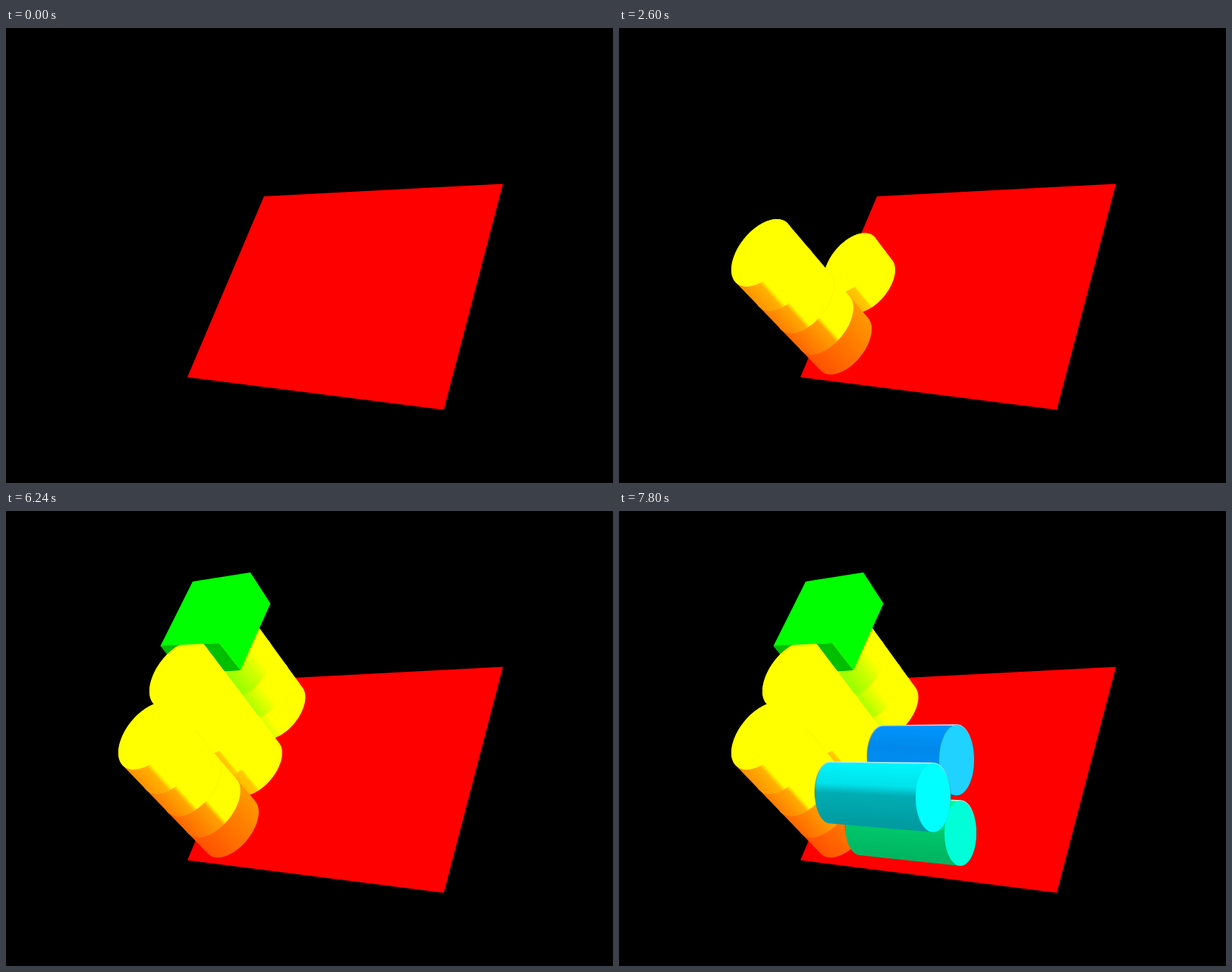
Animation, 800 px wide and 600 px high, one loop 8 s. Source, as an HTML page with a canvas:

```html
<!DOCTYPE html>
<html lang="en">
<head>
<meta charset="utf-8">
<title>Stacking cylinders</title>
<style>
html, body { margin: 0; width: 100%; height: 100%; overflow: hidden; background: #000; }
canvas { display: block; }
</style>
</head>
<body>
<canvas id="stage" width="800" height="600"></canvas>
<script>
const ctx = document.getElementById('stage').getContext('2d');
const LOOP = 8000, BEAT = 520, PI = Math.PI;
const TILT = PI * 2 / 3, UPRIGHT = PI / 2;
const LEVELS = 4, DEPTH = 1.12;   // depth: how much farther away the floor is than level 4

// A ring is [centre x, centre y, half width, half height].
// edge(i, n): where full light starts on drum i of n, as a share of its width
const left = {
  foot: [297, 417, 36, 40], head: [188, 296.5, 40, 44.5],
  dark: i => 19 + 5 * i, mid: i => 36 + 2 * i, soft: 0.06, cap: i => Math.min(60, 30 + 15 * i),
  edge: (i, n) => (0.17 + 0.33 / i) * (n < 3 ? 1.5 : 1)
};
const middle = {
  foot: [329, 338, 35, 38], head: [228, 215.5, 39, 44.5],
  dark: () => 38, mid: () => 48, soft: 0.03, cap: () => 60,
  edge: i => 0.34 - 0.07 * i
};
const right = {
  foot: [361, 264, 33.5, 37], head: [264.5, 143, 38.5, 44.5],
  dark: () => 95, mid: () => 72, soft: 0.2, cap: () => 60,
  edge: i => 0.33 + 0.2 * i
};

const hsl = (hue, light = 50) => `hsl(${hue}, 100%, ${light}%)`;

function poly(color, ...pts) {
  ctx.beginPath();
  pts.forEach(p => ctx.lineTo(...p));
  ctx.fillStyle = color;
  ctx.fill();
}

function arc([x, y, w, h], from, to, skew) {
  return Array.from({ length: 61 }, (_, i) => {
    const a = from + (to - from) * i / 60;
    return [x + w * Math.cos(a), y + h * Math.cos(a + skew)];
  });
}

function cylinder(base, top, stops, cap, skew, rim) {
  const dx = top[0] - base[0], dy = top[1] - base[1], len = Math.hypot(dx, dy);
  const nx = -dy / len, ny = dx / len;
  const [x, y, w, h] = top;
  const a = nx * w + ny * h * Math.cos(skew), b = -ny * h * Math.sin(skew);
  const start = Math.atan2(b, a), reach = Math.hypot(a, b);
  const blend = list => {
    const g = ctx.createLinearGradient(x - nx * reach, y - ny * reach, x + nx * reach, y + ny * reach);
    list.forEach(s => g.addColorStop(...s));
    return g;
  };
  poly(blend(stops),
    ...arc(base, start, start - PI, skew), ...arc(top, start - PI, start - 2 * PI, skew));
  if (rim) {
    ctx.closePath();
    ctx.strokeStyle = blend([[0, rim], [0.65, 'transparent']]);
    ctx.lineWidth = 1.5;
    ctx.stroke();
  }
  poly(cap, ...arc(top, 0, 2 * PI, skew));
}

// Evenly spaced levels as seen in perspective
function ring({ foot, head }, level) {
  const s = level / LEVELS, near = s / (s + (1 - s) * DEPTH);
  return foot.map((v, k) => v + (head[k] - v) * near);
}

function column(col, count) {
  for (let i = 0; i < count; i++) {
    const full = col.edge(i, count);
    const stops = [[0, hsl(col.dark(i))], [Math.min(1, full - col.soft), hsl(col.mid(i))]];
    if (full <= 1) stops.push([full, hsl(60)]);
    cylinder(ring(col, i), ring(col, i + 1), stops, hsl(col.cap(i)), TILT);
  }
}

function lying(back, face, hue, shade, cap) {
  const stops = [[0, hsl(hue)], [0.36, hsl(hue, 46)], [0.5, hsl(hue, shade + 4)], [1, hsl(hue, shade)]];
  cylinder(back, face, stops, cap, UPRIGHT, hsl(hue, 88));
}

function draw(step) {
  const built = (after, max) => Math.max(0, Math.min(max, step - after));
  const box = step >= 12;

  ctx.fillStyle = '#000';
  ctx.fillRect(0, 0, 800, 600);
  poly('#f00', [340, 222], [655, 205.5], [577, 503.5], [239, 460.5]);

  column(right, built(8, 3));
  if (box) poly('#00be00', [203.5, 178], [281, 174], [309, 210], [290, 211.5], [232, 214]);
  column(middle, built(4, 4));
  if (box) poly('#0f0', [246, 93], [322, 81], [348.5, 122], [309, 210], [281, 174], [203.5, 178]);
  column(left, built(0, 4));

  if (step >= 13) lying([318, 415, 20, 39], [450, 425, 21, 43], 152, 35, hsl(171));
  if (step >= 15) lying([348, 324, 21, 41], [445, 328.5, 23, 46.5], 205, 43, hsl(192, 56));
  if (step >= 14) lying([278, 371.5, 20, 40.5], [414, 378, 23, 45.5], 182, 31, hsl(180));
}

function frame(now) {
  draw(Math.floor(now % LOOP / BEAT));
  requestAnimationFrame(frame);
}
requestAnimationFrame(frame);
</script>
</body>
</html>
```
